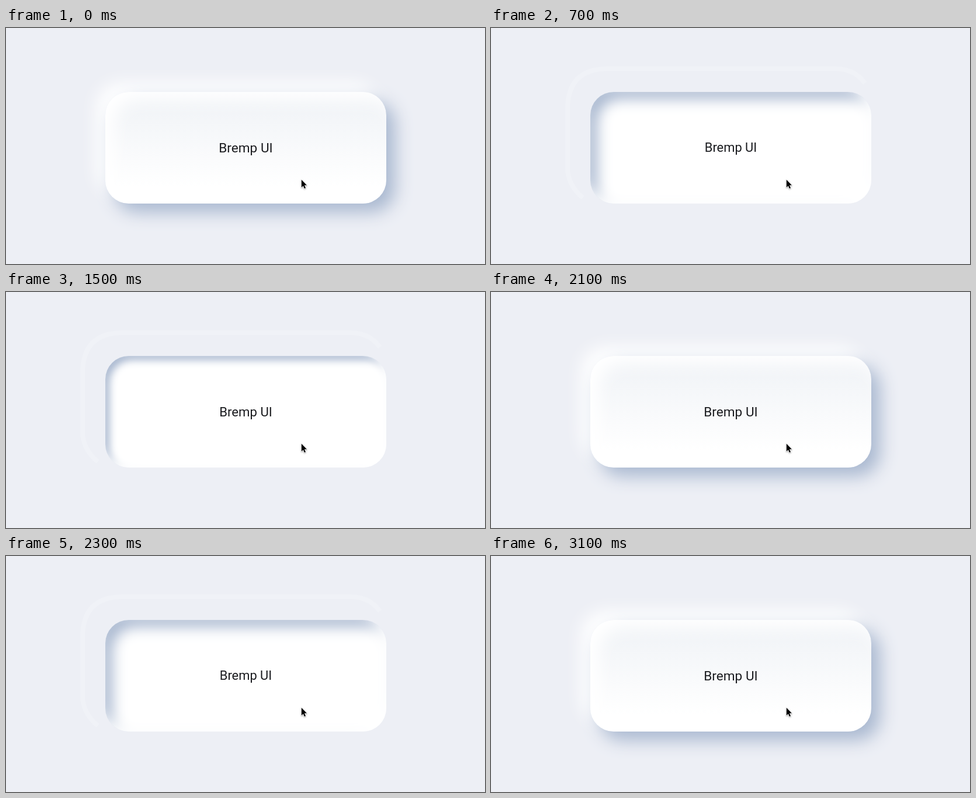
Animation of 820 by 406 pixels, one loop 3700 ms. Source, as an HTML page:

```html
<!DOCTYPE html>
<html lang="en">
<head>
<meta charset="utf-8">
<title>Soft button</title>
<style>
  :root {
    --raised: inset 15px 15px 30px #fff, 15px 15px 30px #a9b8d0, -15px -15px 30px #fff;
    --half: inset -7px -7px 14px #fff, inset 7px 7px 14px #a9b8d0;
    --pressed: inset -12px -12px 24px #fff, inset 12px 12px 24px #a9b8d0;
    --sheen: linear-gradient(#eff2f6, #fff 85%);
  }
  html, body {
    margin: 0;
    width: 100%;
    height: 100%;
    overflow: hidden;
    background: #edeff5;
  }
  .card, .label, .halo, .touch {
    animation: 3700ms step-end infinite;
  }
  .card {
    position: absolute;
    left: 170px;
    top: 110px;
    width: 481px;
    height: 192px;
    border-radius: 40px;
    background: #fff;
    animation-name: card;
  }
  .label {
    position: absolute;
    inset: 0;
    line-height: 194px;
    text-align: center;
    font: 400 22.6px/194px Roboto, sans-serif;
    color: #1a1b1f;
    animation-name: label;
  }
  svg {
    position: absolute;
    left: 0;
    top: 0;
  }
  .halo { animation-name: halo; }
  .touch { animation-name: touch; }

  /* Press at 0.6 s, release at 1.5 s, press at 2.2 s, release at 3 s */
  @keyframes card {
    0%, 43.2432%, 83.7837%, 100% { box-shadow: var(--raised); background-image: var(--sheen); }
    16.2162%, 40.5405%, 59.4594%, 81.081% { box-shadow: var(--half); background-image: none; }
    18.9189%, 62.1621% { box-shadow: var(--pressed); background-image: none; }
  }
  @keyframes label {
    0%, 43.2432%, 83.7837%, 100% { transform: none; }
    16.2162%, 40.5405%, 59.4594%, 81.081% { transform: scale(.98); }
    18.9189%, 62.1621% { transform: translateY(-.5px) scale(.968); }
  }
  @keyframes halo {
    0%, 43.2432%, 83.7837%, 100% { opacity: 0; }
    16.2162%, 59.4594% { opacity: 1; }
  }
  @keyframes touch {
    0%, 40.5405%, 100% { opacity: 0; }
    32.4324% { opacity: 1; }
  }
</style>
</head>
<body>
  <svg width="820" height="406">
    <path class="halo" fill="none" stroke="#f0f2f7" stroke-width="8"
      d="M157 292Q131 270 131 240V140Q131 70 200 70H590Q622 70 640 95"/>
  </svg>
  <div class="card"><div class="label">Bremp UI</div></div>
  <svg width="820" height="406">
    <circle class="touch" cx="506.5" cy="263.5" r="23.5" fill="#e6f3f5"/>
    <path fill="#000" stroke="#fff" stroke-width="1.6" paint-order="stroke" stroke-linejoin="round"
      style="filter: drop-shadow(0 1px 1px #0005)"
      d="M505.8 261V274.2L508.8 271.4L510.9 276.2L513 275.3L510.9 270.6H515Z"/>
  </svg>
</body>
</html>
```
